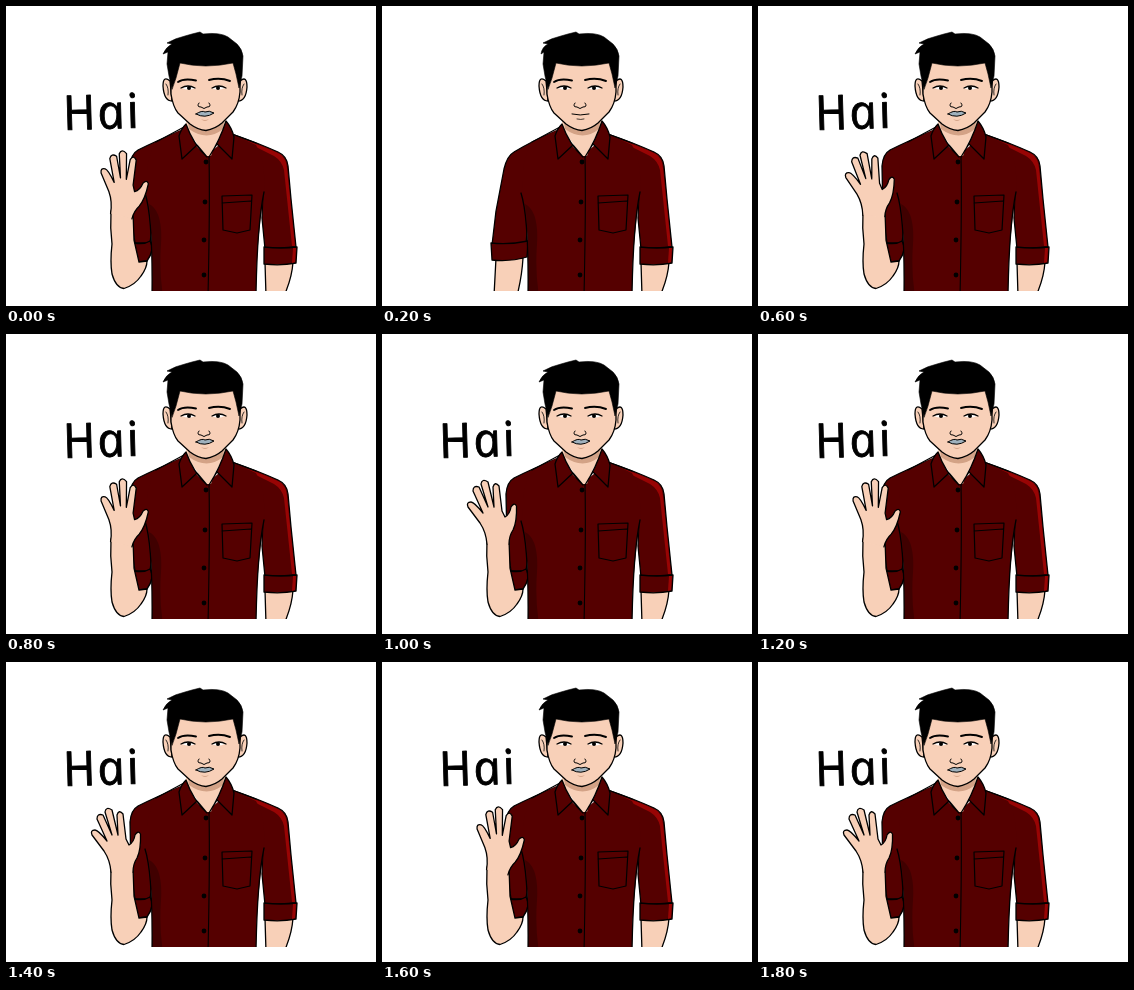
Animation, 370 px wide and 300 px high, one loop 2 s. Source, as an HTML page with a canvas:

```html
<!DOCTYPE html>
<html lang="en">
<head>
<meta charset="utf-8">
<title>Hai</title>
<style>
  html, body { margin: 0; width: 100%; height: 100%; overflow: hidden; background: #fff; }
  canvas { display: block; }
</style>
</head>
<body>
<canvas id="stage" width="370" height="300"></canvas>
<script>
const ctx = document.getElementById('stage').getContext('2d');
const SKIN = '#f8d0b8', SHADE = '#d3a286', RED = '#550000', DARK = '#400000', LIGHT = '#980404', INK = '#000';
const LOOP = 2000, STEP = 200;

function shape(d, fill, line = 1.3) {
  const p = new Path2D(d);
  if (fill) { ctx.fillStyle = fill; ctx.fill(p); }
  if (line) { ctx.lineWidth = line; ctx.stroke(p); }
}
const stroke = (d, width) => shape(d, null, width);

function dot(x, y, r) {
  ctx.fillStyle = INK;
  ctx.beginPath();
  ctx.arc(x, y, r, 0, 7);
  ctx.fill();
}

function rightArm() {
  shape('M259 256L260 290L278 290Q286 272 287 256Z', SKIN);
  shape('M226 128Q252 137 272 146Q281 150 282 160L285 193L290 241L259 243L256 212L257 186Z', RED);
  shape('M232 132Q258 140 274 148Q280 152 281 162L289 240L286 240L278 164Q276 155 268 150Z', LIGHT, 0);
  shape('M258 241Q275 243 291 241L290 257Q275 260 258 258Z', RED);
  shape('M287 242L290 242L289 256L286 257Z', LIGHT, 0);
}

function restingArm() {
  shape('M114 252L112 290L135 290Q140 270 141 252Z', SKIN);
  shape('M174 125Q150 135 132 146Q125 150 122 163L114 205L110 239L144 239L148 186Z', RED);
  shape('M109 237Q127 239 146 235L145 251Q128 256 110 254Z', RED);
}

function raisedSleeve() {
  shape('M174 125Q150 135 132 144Q125 148 124 160L125 210L129 237L144 237L148 205L150 186Z', RED);
  shape('M128 237Q138 239 144 235Q149 244 141 255L132 256Z', RED);
}

function torso() {
  shape('M175 124L150 136Q138 155 141 187Q147 212 146 290L250 290Q250 240 258 186Q260 155 250 139L226 128L200 150Z', RED, 0);
  shape('M143 198Q157 205 155 238Q153 265 157 290L146 290Q148 235 143 198Z', DARK, 0);
  stroke('M178 121L150 136M226 128L250 137M139 187Q147 212 146 290M258 186Q251 220 250 290');
  stroke('M203 151Q204 200 202 290', 1.1);
  stroke('M216 190L246 189L244 224L231 227L217 224ZM216 197L245 195', 1.2);
  for (const [x, y] of [[200, 156], [199, 196], [198, 234], [198, 269]]) dot(x, y, 2.4);
}

function neck() {
  shape('M180 114L220 114L219 124Q209 135 205 150L200 150L180 122Z', SKIN, 0);
  shape('M182 116Q200 131 218 116L217 123Q201 136 183 123Z', SHADE, 0);
  shape('M180 118Q175 123 173 130L176 153L191 139L201 151Q187 138 180 118Z', RED);
  shape('M220 115Q226 122 228 131L226 153L211 138L203 151Q214 134 220 115Z', RED);
}

function head(talking) {
  shape('M164 75Q157 69 157 80Q158 95 166 95Z', SKIN);
  shape('M234 75Q241 69 241 81Q240 95 232 95Z', SKIN);
  stroke('M160 78Q163 82 162 89M238 78Q235 82 236 89', .8);
  shape('M165 50L165 88Q167 101 172 107L184 118Q192 124 200 124.5Q209 123 216 117L227 106Q233 98 234 86L234 50Z', SKIN);
  const x = talking ? 157 : 159;
  shape(`M166 83L163 70L161 58L162 46L${x} 48Q160 41 166 38L161 37Q170 32 179 30L186 28L194 26L197 28Q214 26 222 31L231 38Q236 43 237 50L236 70L233 82L230 68L227 57Q199 63 174 57L170 72Z`, INK, .6);
  stroke('M172 76Q178 72 190 74.5M203 74Q214 71 224 75', 1.9);
  shape('M176 82Q183 78 189 82Q183 85 176 82ZM206 82Q212 78 219 82Q212 85 206 82Z', '#fff', 0);
  stroke('M175 82Q182 78 189 82M206 82Q213 78 220 82', 1.3);
  dot(183, 82, 2);
  dot(212, 82, 2);
  stroke('M193 97Q190 101 195 101Q198 104 201 101Q206 101 203 97', 1);
  if (talking) {
    shape('M190 108Q196 104 199 106Q203 104 208 107Q199 113 190 108Z', '#9fb1bd', 1);
    shape('M195 113Q199 115 203 113Q199 117 195 113Z', SHADE, 0);
  } else {
    stroke('M190 108Q198 110 207 108', 1);
    stroke('M195 113Q199 114 202 113', .7);
  }
}

function wave(degrees) {
  shape('M105 205Q104 222 106 238Q104 256 106 268Q110 282 118 282.5Q129 279 135 270Q141 262 141 255L133 256L128 234L127 205', SKIN);
  ctx.save();
  ctx.translate(115, 207);
  ctx.rotate(degrees * Math.PI / 180);
  ctx.translate(-115, -207);
  shape('M105 210Q104 198 98 189L86 173Q84 168 89 168Q92 168 101 179L91 157Q91 151 97 153L106 173L99 150Q100 144 106 148L112 173L111 153Q113 147 117 152L120 177L123 183Q128 180 129 173Q132 168 134.5 172Q135 188 131 196Q127 202 127 210', SKIN);
  ctx.restore();
}

function greeting() {
  ctx.save();
  ctx.translate(60, 124);
  ctx.rotate(-.03);
  // Upright setting of the italic, for its round "a"
  ctx.transform(1, 0, .21, 1, 0, 0);
  ctx.font = 'italic 48px "Open Sans", sans-serif';
  ctx.letterSpacing = '2px';
  ctx.fillStyle = INK;
  ctx.lineWidth = .8;
  ctx.fillText('Hai', 0, 0);
  ctx.strokeText('Hai', 0, 0);
  ctx.restore();
}

function draw(t) {
  const step = Math.floor(t / STEP);
  const resting = step === 1 || step === 2;
  ctx.fillStyle = '#fff';
  ctx.fillRect(0, 0, 370, 300);
  ctx.save();
  ctx.beginPath();
  ctx.rect(0, 0, 370, 285);
  ctx.clip();
  ctx.lineJoin = ctx.lineCap = 'round';
  ctx.strokeStyle = INK;
  rightArm();
  if (resting) restingArm(); else raisedSleeve();
  torso();
  neck();
  head(!resting);
  if (!resting) {
    wave(step === 3 ? 3 : step % 2 ? 0 : 14);
    greeting();
  }
  ctx.restore();
}

function tick(now) {
  draw(now % LOOP);
  requestAnimationFrame(tick);
}
draw(0);
requestAnimationFrame(tick);
</script>
</body>
</html>
```
